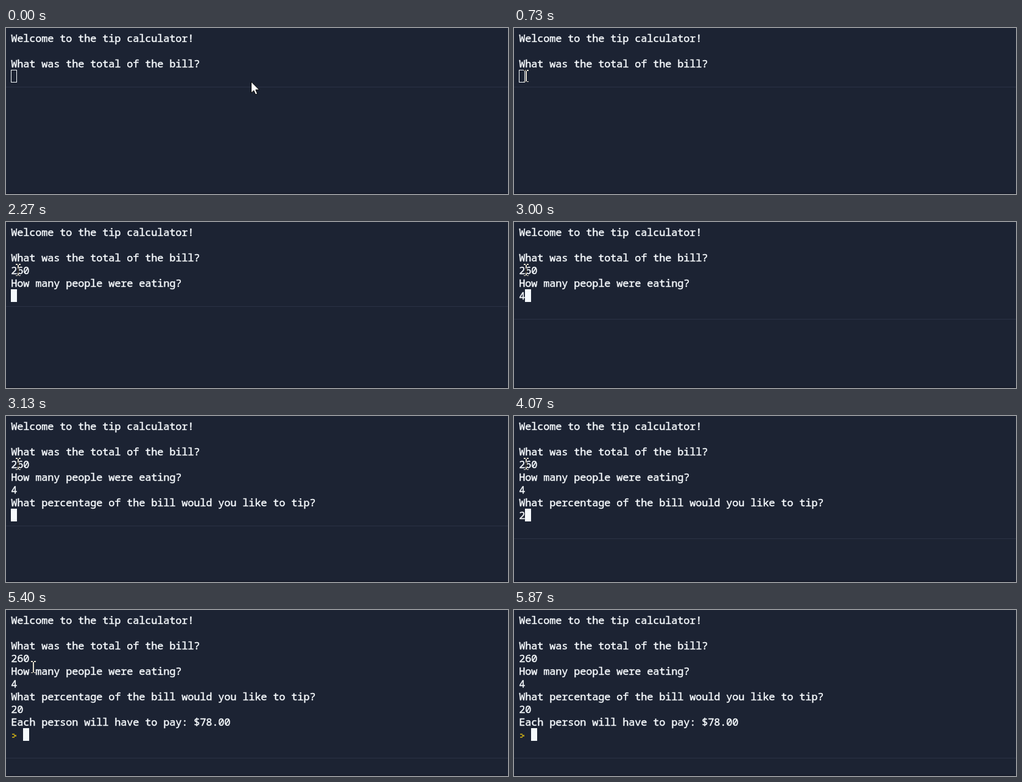
An HTML page for the animation above (6.54 s loop, 824x274 px).

```html
<!DOCTYPE html>
<html lang="en">
<head>
<meta charset="utf-8">
<title>Tip calculator</title>
<style>
  html, body { margin: 0; width: 100%; height: 100%; overflow: hidden; background: #1c2333; }
  #stage { position: relative; width: 824px; height: 274px; overflow: hidden; background: #1c2333; isolation: isolate; }
  #stage > * { position: absolute; }
  #text {
    left: 8.2px; top: 6px; margin: 0; color: #f5f9fc; white-space: pre;
    font: 400 17px/21px "Noto Sans Mono", "DejaVu Sans Mono", monospace;
    letter-spacing: -.2px; font-variant-ligatures: none;
    -webkit-text-stroke: .45px #f5f9fc;
  }
  #caret { width: 10px; height: 21px; box-sizing: border-box; border: 1px solid #f5f9fc; }
  #caret.on { background: #f5f9fc; }
  #rule { left: 0; width: 824px; height: 1px; background: #2b3245; }
  #edge { left: 0; top: 272px; width: 824px; height: 2px; background: #171c2a; }
  #prompt { left: 8px; top: 200px; }
  #beam { mix-blend-mode: difference; }
</style>
</head>
<body>
<div id="stage">
  <pre id="text"></pre>
  <div id="caret"></div>
  <svg id="prompt" width="12" height="14"><path d="M2 4h4v2h-4zM5 6h4v3h-4zM2 9h4v2h-4z" fill="#a8921c"/></svg>
  <div id="rule"></div>
  <div id="edge"></div>
  <svg id="beam" width="8" height="20"><path d="M0 0h3v2h-3zM5 0h3v2h-3zM3 2h2v17h-2zM0 19h3v1h-3zM5 19h3v1h-3z" fill="#fff"/></svg>
  <svg id="arrow" width="16" height="24"><path d="M.5 .8V19.2L4.7 15.2 7.6 21.8 10.6 20.5 7.8 14H13.7Z" fill="#fff" stroke="#000" stroke-width="1"/></svg>
</div>
<script>
const LOOP = 6540, FOCUS = 930, CELL = 10, ROW = 21;

// time, text added, y of the rule
const typing = [
  [0, 'Welcome to the tip calculator!\n\nWhat was the total of the bill?\n', 97],
  [1330, '2', 97],
  [1400, '', 118],
  [1730, '6', 118],
  [1870, '0', 118],
  [2270, '\nHow many people were eating?\n', 139],
  [3000, '4', 160],
  [3130, '\nWhat percentage of the bill would you like to tip?\n', 181],
  [4070, '2', 202],
  [4200, '0', 202],
  [4400, '\nEach person will have to pay: $78.00\n  ', 244]
];

// time, pointer shape, left, top
const pointer = [
  [0, 'arrow', 402, 88],
  [70, 'beam', 287, 29],
  [330, 'beam', 172, 44],
  [400, 'beam', 62, 58],
  [470, 'beam', 9, 64],
  [530, 'beam', 13, 66],
  [670, 'beam', 15, 68],
  [730, 'beam', 16, 69],
  [5400, 'beam', 41, 84],
  [5470, 'beam', 66, 106],
  [5530, 'beam', 91, 134],
  [5600, 'beam', 113, 165],
  [5670, 'beam', 131, 197],
  [5730, 'beam', 145, 229],
  [5800, 'beam', 155, 258],
  [5870, 'none', 0, 0]
];

const el = id => document.getElementById(id);
const place = (node, x, y) => { node.style.left = x + 'px'; node.style.top = y + 'px'; };
const show = (node, on) => { node.style.visibility = on ? 'visible' : 'hidden'; };
const past = (steps, t) => steps.filter(step => step[0] <= t);

function draw(t) {
  const done = past(typing, t);
  const text = done.map(step => step[1]).join('');
  const rows = text.split('\n');
  if (el('text').textContent !== text) el('text').textContent = text;
  place(el('caret'), 8 + rows.at(-1).length * CELL, 6 + (rows.length - 1) * ROW);
  el('caret').className = t >= FOCUS ? 'on' : '';
  el('rule').style.top = done.at(-1)[2] + 'px';
  show(el('prompt'), done.length === typing.length);

  const [, shape, x, y] = past(pointer, t).at(-1);
  for (const id of ['arrow', 'beam']) {
    show(el(id), id === shape);
    place(el(id), x, y);
  }
}

const start = performance.now();
function tick() {
  draw((performance.now() - start) % LOOP);
  requestAnimationFrame(tick);
}
draw(0);
requestAnimationFrame(tick);
</script>
</body>
</html>
```
